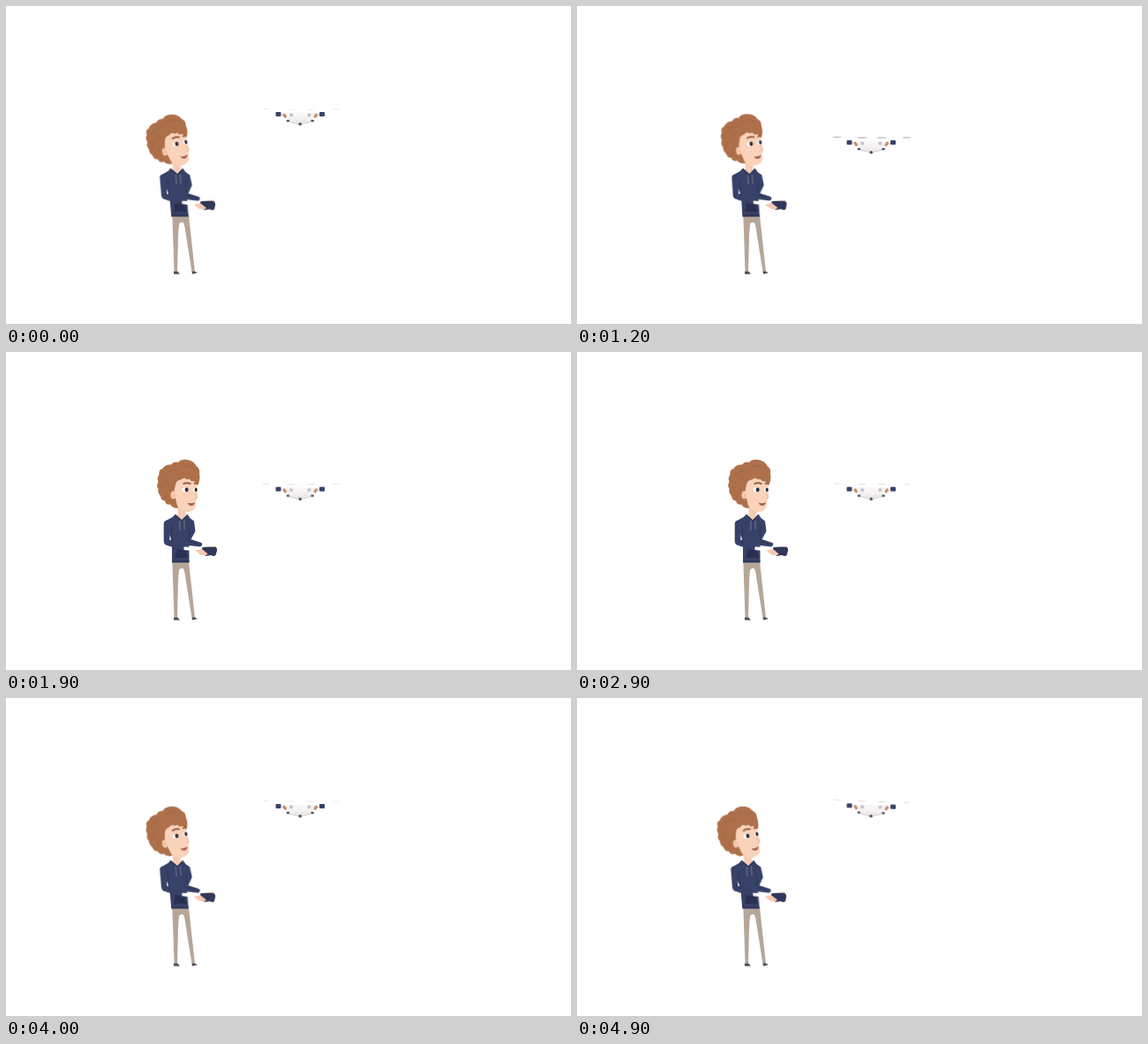
Animation of 640 by 360 pixels, one loop 5 s. Source, as an HTML page without scripts:

```html
<!DOCTYPE html>
<html lang="en">
<head>
<meta charset="utf-8">
<title>Drone pilot</title>
<style>
html, body { margin: 0; width: 100%; height: 100%; overflow: hidden; background: #fff; }
svg { display: block; width: 100vw; height: 100vh; }

.drone, .head, .torso, .tick { animation: 5s step-end infinite; }
.drone { animation-name: fly; transform-origin: 333px 125px; }
.head { animation-name: look; transform-origin: 200px 185px; }
.torso { animation-name: lean; transform-origin: 198px 238px; }
.tick { animation-name: flash; opacity: 0; }
.prop { animation: spin .5s step-end infinite; transform-box: fill-box; transform-origin: center; }
.far { animation-name: spin-far; }

@keyframes fly {
  0%, 14% { transform: none; }
  16% { transform: translateY(3px); }
  18% { transform: translateY(10px); }
  20% { transform: translateY(20px); }
  22% { transform: translateY(28px); }
  24% { transform: translateY(32px); }
  26%, 66% { transform: translateY(32.7px); }
  68% { transform: translateY(31px) rotate(-2deg); }
  70% { transform: translateY(25px) rotate(-4deg); }
  72% { transform: translateY(16.5px) rotate(-4.6deg); }
  74% { transform: translateY(8px) rotate(-3deg); }
  76% { transform: translateY(3px) rotate(-1deg); }
  78% { transform: translateY(.5px); }
  80%, 96% { transform: none; }
  98%, 100% { transform: rotate(1.6deg); }
}
@keyframes look {
  0% { transform: translate(-5px, .5px) rotate(-12deg); }
  4%, 18% { transform: translate(-6px, .5px) rotate(-13deg); }
  20% { transform: translate(-5px, .5px) rotate(-12deg); }
  22% { transform: translate(-4px, .4px) rotate(-10.5deg); }
  24% { transform: translate(-3px, .3px) rotate(-8.5deg); }
  26% { transform: translate(-2px, .2px) rotate(-5deg); }
  28% { transform: translate(-1px, 0) rotate(-2deg); }
  30%, 70% { transform: none; }
  72% { transform: translate(1px, 0) rotate(.5deg); }
  74% { transform: translate(-1px, 0) rotate(-3deg); }
  76% { transform: translate(-2.5px, .2px) rotate(-7deg); }
  78% { transform: translate(-4px, .4px) rotate(-11deg); }
  80%, 100% { transform: translate(-5px, .5px) rotate(-12deg); }
}
@keyframes lean {
  0%, 20% { transform: translateX(-.8px) skewX(4.8deg); }
  24% { transform: translateX(-.6px) skewX(3.6deg); }
  26% { transform: skewX(2.2deg); }
  28% { transform: skewX(1deg); }
  30%, 72% { transform: none; }
  74% { transform: skewX(1.2deg); }
  76% { transform: translateX(-.4px) skewX(2.8deg); }
  78% { transform: translateX(-.6px) skewX(4.2deg); }
  80%, 100% { transform: translateX(-.8px) skewX(4.8deg); }
}
@keyframes flash { 0% { opacity: 0; } 72% { opacity: 1; } 74%, 100% { opacity: 0; } }
@keyframes spin {
  0% { transform: scale(.8, .4); opacity: .45; }
  20% { transform: scale(1, .9); opacity: .9; }
  40% { transform: none; opacity: 1; }
  60% { transform: scale(.7, .8); opacity: .8; }
  80%, 100% { transform: scale(.85, .45); opacity: .8; }
}
@keyframes spin-far {
  0% { transform: scale(.8, .4); opacity: .6; }
  20% { opacity: 0; }
  40% { transform: none; opacity: 1; }
  60% { transform: scale(.7, .8); opacity: .8; }
  80%, 100% { transform: scale(.85, .45); opacity: .8; }
}
</style>
</head>
<body>
<svg viewBox="0 0 640 360" preserveAspectRatio="none">
  <defs>
    <linearGradient id="shell" x2="0" y2="1">
      <stop stop-color="#fbf9f8"/><stop offset="1" stop-color="#eeebeb"/>
    </linearGradient>
    <g id="arm">
      <path d="M310 121.500L320 121.500L320 125L310 124Z" fill="#f6f3f3"/>
      <rect x="305.500" y="120" width="6" height="5" rx="1" fill="#3b436a"/>
      <path d="M314.500 122L317.500 126" stroke="#d48a5c" stroke-width="2.400"/>
      <path d="M313.300 123.200L316.500 127" stroke="#8a6255" stroke-width=".8"/>
      <path d="M321 121.500l4.500 .5l-1 3.500l-3-.6z" fill="#c3c2cc"/>
      <path d="M318 130L333 134" stroke="#c4c1c2" stroke-width=".9"/>
      <rect x="317.700" y="128.800" width="3.400" height="2.400" rx=".8" fill="#575868"/>
    </g>
  </defs>

  <g class="drone">
    <path d="M317 120.500H350L346 130L333 134L320.500 130Z" fill="url(#shell)"/>
    <use href="#arm"/>
    <use href="#arm" transform="matrix(-1 0 0 1 666.5 0)"/>
    <path d="M327 129L333 131.500L340 129" fill="none" stroke="#dddadb" stroke-width=".8"/>
    <circle cx="333.200" cy="133.800" r="1.700" fill="#4b4d5c"/>
    <g fill="#cfcdcf">
      <ellipse class="prop far" cx="294.500" cy="116.500" rx="5" ry="1.100"/>
      <ellipse class="prop" cx="323" cy="117.200" rx="6" ry="1.100"/>
      <ellipse class="prop" cx="345" cy="117.200" rx="6" ry="1.100"/>
      <ellipse class="prop" cx="373.500" cy="117" rx="5" ry="1.100"/>
    </g>
  </g>

  <g class="legs">
    <path d="M188.300 237H207L214 301H210.500L203.800 259Q202.500 246.500 200.500 245Q198 244 196.200 246.500Q195 254 194.800 270L194 301H190.500L189.500 270Z" fill="#b5a698"/>
    <path d="M190 300.500H194.500L197 303.500H190ZM210.500 300.500H214L217 302L211 303.500Z" fill="#4f4a54"/>
  </g>

  <g class="torso">
    <path d="M194.500 174H203.500V186L199.500 190L194.500 187Z" fill="#f6cbb3"/>
    <path d="M192 183.500L199 190L205.500 183.500L208.500 188L213 191.500L214.500 203L209.500 212L221.500 216Q223.500 218.500 220 220.500L207.500 219L207.500 238.500H188V220L181 218.500Q178.500 217 178.700 213V194Q179 191 183 190L188.500 187Z" fill="#384167"/>
    <path d="M185 214L206 222V226L184 219.500Z" fill="#384167"/>
    <path d="M187.500 196V216M208 198L207 211M207 214L218 218" fill="none" stroke="#2a3155" stroke-width=".8"/>
    <path d="M185.800 207L187.200 213L185 212.500Z" fill="#e8e8ee"/>
    <path d="M193.500 223L204 225L206 233H191.500Z" fill="#2a3052"/>
    <path d="M188 237H207.500" stroke="#2a3052" stroke-width="1.400"/>
    <path d="M192.800 185.500L199 191L205 185.500" fill="none" stroke="#2a3155" stroke-width="1"/>
    <path d="M197 191V202M202 190.500V201" stroke="#8b8a92" stroke-width=".8"/>
    <path d="M201.500 220.500L207.500 220.800L214 223.500L211.500 225.200L201.500 224Z" fill="#fff"/>
    <path d="M222.500 221L236 220.300Q239.500 221 239 225L237.500 230Q236 232 232 230L226 231L221.500 226Z" fill="#31375a"/>
    <path d="M231 220.400L237 219.400L238 221Z" fill="#e2b8a2"/>
    <path d="M214.500 224.800L222 223L228.500 228.500L226 230.500L220.500 229.700Z" fill="#f5c9b1"/>
  </g>
  <path class="tick" d="M239.500 213.300H244" stroke="#777" stroke-width="1"/>

  <g class="head">
    <path d="M205 122Q198 121 195 125Q190 123.500 187 127.500Q180 127 177.500 132Q172.500 133 173.500 139Q170.500 142 172.500 147Q169.800 151 172.500 155Q171.500 160 175 163Q175.500 168 180 168.500Q181 173.500 186 172.500Q189 177.500 195 176.500L206 160L217.500 150Q220.500 144 219 138Q220 132 216 129.500Q212.500 122.500 205 122Z" fill="#ae704a"/>
    <path d="M176 142Q183 134 194 133M175 156Q179 147 187 143M180 166Q182 158 187 153M198 130Q207 126 214 133" fill="none" stroke="#9f6341" stroke-width=".7"/>
    <path d="M190.500 160Q191 148 195.500 144.500Q199 140.500 207 142Q213 141 216 147L216.300 157L217.400 165L215.300 168L214.500 176Q211 181.500 204.500 181Q197 180 194 174L192 166Z" fill="#f9d2ba"/>
    <ellipse cx="189.500" cy="162" rx="3" ry="4.400" fill="#f6caaf"/>
    <path d="M188.500 160Q190.500 160.500 190 164" fill="none" stroke="#dcaa8f" stroke-width=".7"/>
    <path d="M194 146Q199 138 208 138Q215 137 218.300 148L216.500 150.500Q214 145 210 146.500Q208 142.500 205 144.500Q202.500 141.500 199 144Z" fill="#ae704a"/>
    <path d="M200.500 149.500Q204.500 147.200 209.500 149.300M213 149.500Q215 147.800 217 149" fill="none" stroke="#975f42" stroke-width="1.900"/>
    <ellipse cx="203" cy="156" rx="3.300" ry="2.400" fill="#fff"/>
    <ellipse cx="214" cy="156" rx="2.200" ry="2.200" fill="#fff"/>
    <ellipse cx="204.600" cy="156" rx="2" ry="2.400" fill="#35313a"/>
    <ellipse cx="215.200" cy="156" rx="1.600" ry="2.200" fill="#35313a"/>
    <path d="M214.200 160L216.500 165L213 166.500" fill="none" stroke="#e6b49a" stroke-width=".7"/>
    <path d="M205.500 170.800Q209.500 172 214 170.300Q213 174.500 209 174Q206.500 173.300 205.500 170.800Z" fill="#a8604f"/>
  </g>
</svg>
</body>
</html>
```
